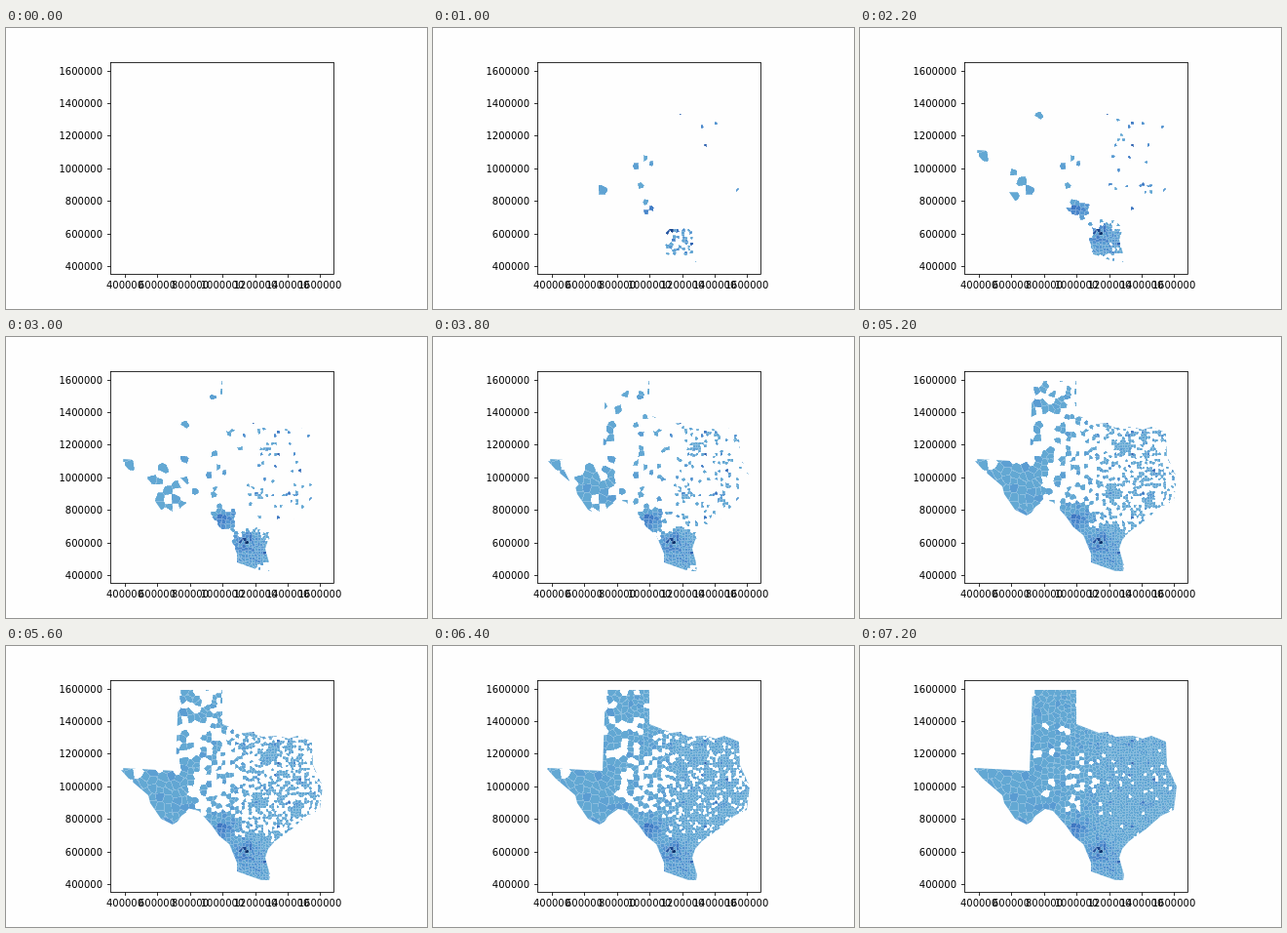
These frames come from a looping animation (432 by 288 pixels, 7.4 s). An HTML page with a canvas:

```html
<!DOCTYPE html>
<html lang="en">
<head>
<meta charset="utf-8">
<title>Map filling in</title>
<style>
  html, body { margin: 0; overflow: hidden; background: #fefefe; }
  canvas { display: block; width: 432px; height: 288px; }
</style>
</head>
<body>
<canvas id="stage" width="432" height="288"></canvas>
<script>
const ctx = document.getElementById('stage').getContext('2d');
const W = 432, H = 288, STEP = 200, STEPS = 37, MEAN_START = 29.3;

const outline = new Path2D(`M177 45H222V80L245 89L254 88L262 93L280 92L290 95L299 92L314 98
  L315 122L325 144L322 168L309 174L293 188L276 200L269 208L266 217L271 235L270 240L262 240
  L237 231V222L229 203L219 195L212 185L198 169L190 167L180 174L176 180L171 183L159 177
  L148 161L146 153L126 136L117 126L118 125L174 128Z`);

// Places that fill earlier or later than the rest: x, y, radius, shift in steps
const places = [
  [251, 217, 24, -23], [224, 187, 14, -22], [161, 158, 30, -14], [124, 132, 9, -18],
  [270, 113, 8, -13], [259, 160, 9, -10], [297, 168, 7, -12],
  [212, 145, 28, 3.5], [241, 194, 7, 10]
];

let seed = 20;
function random() {
  seed = seed + 0x6D2B79F5 | 0;
  let t = Math.imul(seed ^ seed >>> 15, 1 | seed);
  t = t + Math.imul(t ^ t >>> 7, 61 | t) ^ t;
  return ((t ^ t >>> 14) >>> 0) / 4294967296;
}

const glow = (x, y, cx, cy, r, power = 2) => Math.exp(-((Math.hypot(x - cx, y - cy) / r) ** power));

function makeCell(x, y) {
  const u = .002 + .996 * random(), shade = random();
  const logit = Math.log(u / (1 - u));
  const mean = places.reduce((m, [cx, cy, r, shift]) => m + shift * glow(x, y, cx, cy, r, 4), MEAN_START);
  const spread = (1.5 + Math.max(0, mean) / 8) * (logit > 0 ? .45 : 1);
  const start = Math.max(1, mean + spread * logit);

  const dark = Math.min(1, shade ** 6 * .12 + (x > 228 && u < .03 ? .5 * shade : 0)
    + 1.4 * shade * glow(x, y, 246, 210, 5) + .3 * shade * glow(x, y, 246, 214, 16)
    + .45 * shade * glow(x, y, 225, 187, 10));
  return { x, y, start, color: [99 - 91 * dark, 168 - 120 * dark, 211 - 104 * dark ** 2] };
}

// Cells shrink from west to east
const pitchAt = x => Math.min(9, Math.max(2.8, 9 - (x - 145) * .056));
const cells = [];
for (let x = 115; x < 330; x += pitchAt(x)) {
  const pitch = pitchAt(x), wobble = () => (random() - .5) * pitch * .7;
  for (let y = 42; y < 245; y += pitch) cells.push(makeCell(x + wobble(), y + wobble()));
}

// Nearest cell of each pixel; pixels near a border are lighter
const pixels = [];
for (let y = 43; y < 243; y++) {
  const row = cells.filter(c => Math.abs(c.y - y) < 14);
  for (let x = 115; x < 328; x++) {
    let first = 1e9, second = 1e9, cell;
    for (const c of row) {
      const d = (c.x - x - .5) ** 2 + (c.y - y - .5) ** 2;
      if (d < first) { second = first; first = d; cell = c; }
      else if (d < second) second = d;
    }
    const edge = Math.sqrt(second) - Math.sqrt(first) < .8 ? .25 : 0;
    pixels.push({ at: (y * W + x) * 4, start: cell.start, color: cell.color.map(c => c + (254 - c) * edge) });
  }
}

const layer = document.createElement('canvas');
layer.width = W;
layer.height = H;
const layerCtx = layer.getContext('2d');

function drawMap(step) {
  const image = layerCtx.createImageData(W, H);
  for (const p of pixels)
    if (p.start <= step) image.data.set([...p.color, 255], p.at);
  layerCtx.putImageData(image, 0, 0);
  ctx.save();
  ctx.clip(outline);
  ctx.drawImage(layer, 0, 0);
  ctx.restore();
}

function drawAxes() {
  ctx.fillStyle = ctx.strokeStyle = '#000';
  ctx.lineWidth = .8;
  ctx.font = '10px "DejaVu Sans", sans-serif';
  ctx.strokeRect(107.5, 35.5, 229, 217);
  ctx.beginPath();
  for (let i = 0; i < 7; i++) {
    const label = 400000 + i * 200000;
    const x = Math.round(122 + i * 33.4), y = Math.round(244 - i * 33.4);
    ctx.moveTo(x + .5, 252.5);
    ctx.lineTo(x + .5, 256);
    ctx.moveTo(107.5, y + .5);
    ctx.lineTo(104, y + .5);
    ctx.textAlign = 'center';
    ctx.fillText(label, x, 267);
    ctx.textAlign = 'right';
    ctx.fillText(label, 99, y + 4);
  }
  ctx.stroke();
}

let shown = -1;
function frame() {
  const step = Math.floor(performance.now() / STEP) % STEPS;
  if (step !== shown) {
    shown = step;
    ctx.fillStyle = '#fefefe';
    ctx.fillRect(0, 0, W, H);
    drawMap(step);
    drawAxes();
  }
  requestAnimationFrame(frame);
}
frame();
</script>
</body>
</html>
```
